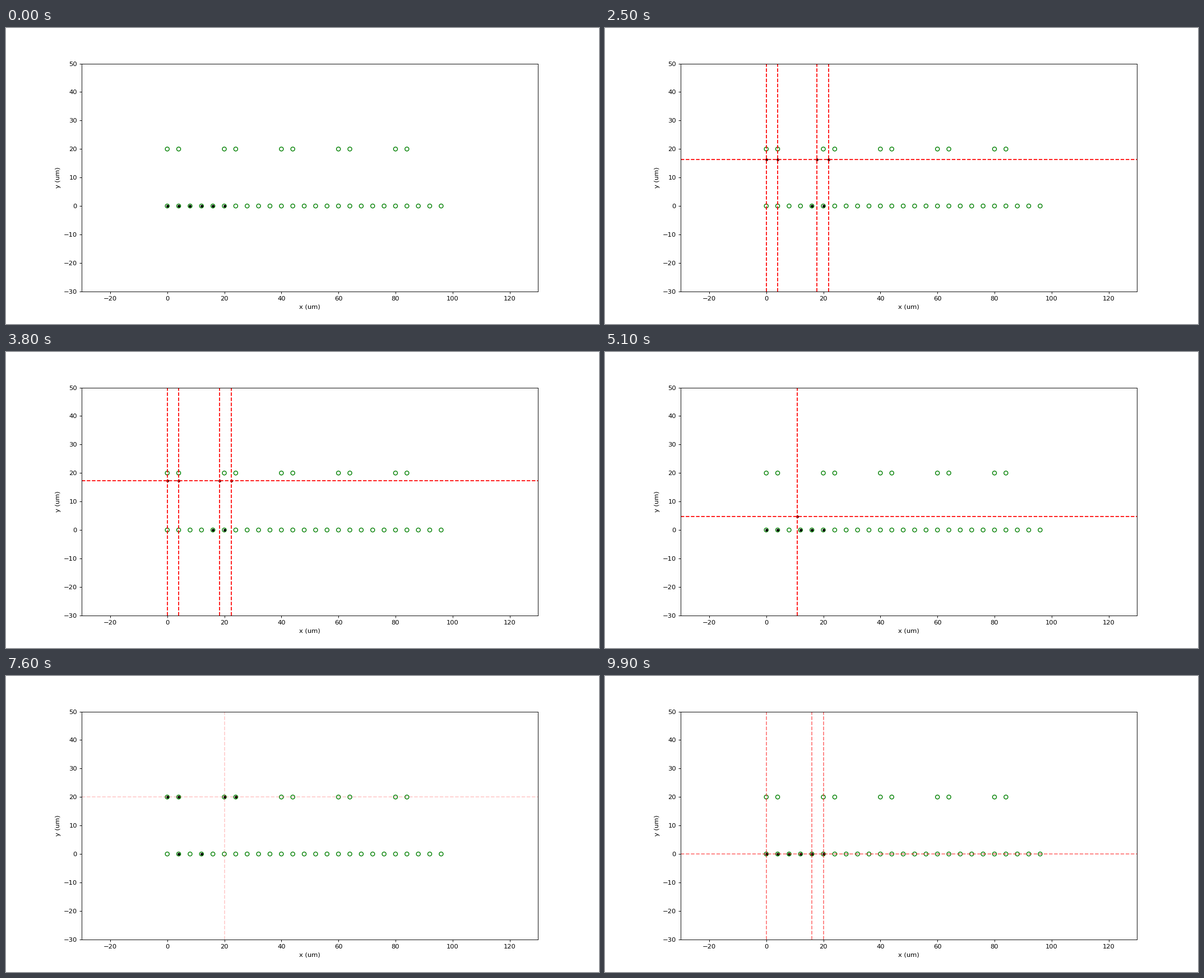
These frames come from a looping animation (1058 px wide and 529 px high, 10 s). A matplotlib script:

```python
import numpy as np
import matplotlib.pyplot as plt
from matplotlib.animation import FuncAnimation

FRAMES, INTERVAL = 100, 100
RAMP, TRAVEL = 1.5, 9.209        # trap fade and transport, in frames
PULSE = (7, 17)                  # frames with the gate highlight

HOME = np.array([(4.0 * i, 0.0) for i in range(6)])
# start frame, {atom: target}
JOBS = [
    (16.80, {0: (0, 20), 1: (4, 20), 2: (20, 20), 3: (24, 20)}),
    (34.39, {i: tuple(HOME[i]) for i in range(4)}),
    (46.60, {2: (20, 20)}),
    (58.81, {0: (0, 20), 4: (4, 20), 5: (24, 20)}),
    (75.70, {2: tuple(HOME[2])}),
    (87.60, {i: tuple(HOME[i]) for i in (0, 4, 5)}),
]

fig, ax = plt.subplots(figsize=(12.8, 6.4), dpi=1058 / 12.8)
fig.subplots_adjust(top=0.8798)
ax.set_aspect("equal")
ax.set(xlim=(-30, 130), ylim=(-30, 50), xlabel="x (um)", ylabel="y (um)")
ax.set_xticks(range(-20, 121, 20))
ax.set_yticks(range(-30, 51, 10))

sites = [(4 * i, 0) for i in range(25)]
sites += [(20 * i + dx, 20) for i in range(5) for dx in (0, 4)]
ax.scatter(*zip(*sites), s=38, facecolors="none", edgecolors="green", linewidths=1.2)

glow = ax.scatter(*HOME.T, s=300, color=(0, 0, 1, 0.3), linewidths=0, zorder=0.9)
atoms = ax.scatter(*HOME.T, s=10, color="black", linewidths=1)
row = ax.axhline(0, ls="--", color="red")
cols = [ax.axvline(0, ls="--", color="red") for _ in range(4)]


def ease(s):
    s = np.clip(s, 0, 1)
    return s * s * (3 - 2 * s)


def state(frame):
    """Atom positions, the atoms held by the trap, and the trap opacity."""
    pos, held, alpha = HOME.copy(), [], 0.0
    for start, moves in JOBS:
        t = frame - start
        if t <= 0:
            break
        k = ease((t - RAMP) / TRAVEL)
        for i, target in moves.items():
            pos[i] += k * (np.array(target) - pos[i])
        held = list(moves)
        alpha = np.clip(min(t, 2 * RAMP + TRAVEL - t) / RAMP, 0, 1)
    return pos, held, alpha


def update(frame):
    pos, held, alpha = state(frame)
    atoms.set_offsets(pos)
    glow.set_visible(PULSE[0] <= frame < PULSE[1])
    color = (1, 0, 0, alpha)
    on = alpha > 0.02
    row.set_visible(on)
    if on:
        row.set_ydata([pos[held[0], 1]] * 2)
        row.set_color(color)
    for n, line in enumerate(cols):
        show = on and n < len(held)
        line.set_visible(show)
        if show:
            line.set_xdata([pos[held[n], 0]] * 2)
            line.set_color(color)
    return [atoms, glow, row, *cols]


anim = FuncAnimation(fig, update, frames=FRAMES, interval=INTERVAL,
                     init_func=lambda: update(0), repeat=True, repeat_delay=0)
plt.show()
```
